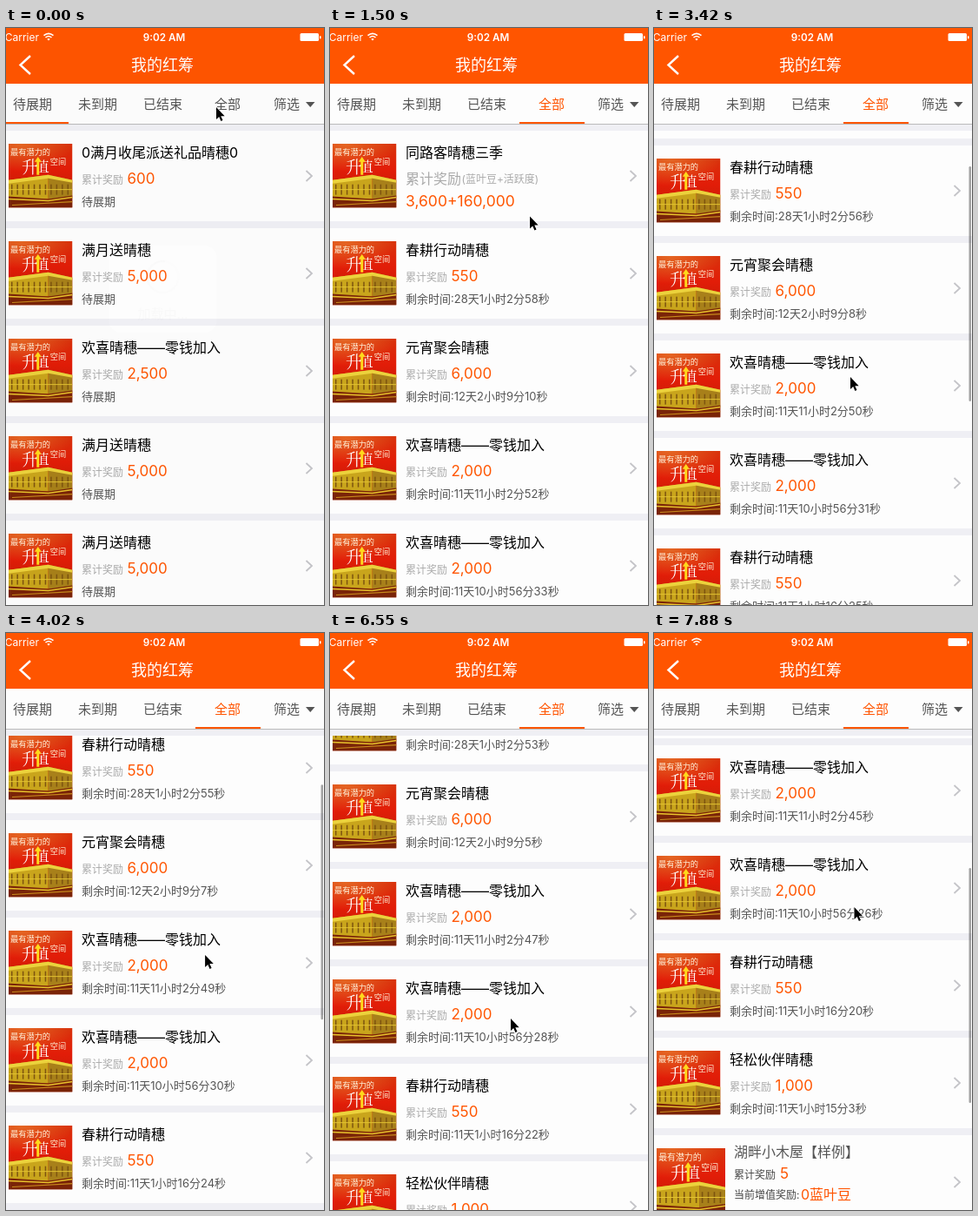
Animation of 366 by 663 pixels, one loop 8000 ms. Source, as an HTML page:

```html
<!DOCTYPE html>
<html lang="zh-CN">
<head>
<meta charset="utf-8">
<style>
html, body { margin: 0; width: 100%; height: 100%; overflow: hidden; background: #efeff4; }
svg { display: block; }
text { font-family: Inter, "Noto Sans CJK SC", "Noto Sans CJK", sans-serif; white-space: pre; }
.serif { font-family: "Noto Serif CJK SC", "Noto Sans CJK SC", serif; }
</style>
</head>
<body>
<svg id="stage" width="366" height="663" viewBox="0 0 366 663"></svg>
<script>
const ORANGE = '#f50', GRAY = '#555', PALE = '#aaa', PITCH = 112;
const $ = id => document.getElementById(id);

// y is the optical middle of the line
const text = (x, y, size, fill, str, attrs = '') =>
  `<text x="${x}" y="${y + size * .37}" font-size="${size}" fill="${fill}" ${attrs}>${str}</text>`;
const rect = (x, y, w, h, fill, attrs = '') =>
  `<rect x="${x}" y="${y}" width="${w}" height="${h}" fill="${fill}" ${attrs}/>`;
const line = (d, stroke, width) =>
  `<path d="${d}" fill="none" stroke="${stroke}" stroke-width="${width}"/>`;
const range = (n, fn) => Array.from({ length: n }, (_, i) => fn(i)).join('');

const thumb = `<symbol id="thumb" viewBox="0 0 74 74">
  ${rect(0, 0, 74, 74, 'url(#sky)')}
  ${rect(0, 0, 74, 40, 'url(#glow)')}
  <path d="M0 42 46 36V64H0Z" fill="#c9a51c"/>
  <path d="M46 36 74 42V62L46 64Z" fill="#a8801a"/>
  <path d="M0 42 46 36 74 42V45L46 40 0 46Z" fill="#ecd23c"/>
  ${range(11, i => rect(3 + i * 6.5, 47, 1.5, 12, '#7d5410'))}
  ${line('M0 53H74', '#e2c232', 1)}
  <path d="M0 61 46 64 74 60V74H0Z" fill="#7a2408"/>
  ${line('M0 64 46 66 74 62', '#e8c22c', 1.5)}
  ${line('M4 71 74 67', '#c88a1c', 1.2)}
  ${text(2, 10, 9.3, '#fff3dc', '最有潜力的', 'font-weight="500"')}
  ${text(48, 21, 9.3, '#fff3dc', '空间', 'font-weight="500"')}
  ${text(15, 27, 19, '#fff', '升', 'class="serif"')}
  ${text(31, 26, 16, '#fff', '值', 'class="serif"')}
  <path d="M34 15 38 21H35.500V36H32.500V21H30Z" fill="#ffd91c"/>
</symbol>`;

const defs = `<defs>
  <linearGradient id="sky" x2="0" y2="1">
    <stop stop-color="#d8330c"/><stop offset=".4" stop-color="#e21d08"/><stop offset="1" stop-color="#b51c06"/>
  </linearGradient>
  <radialGradient id="glow" cx=".2" cy="0" r=".8">
    <stop stop-color="#e8742a" stop-opacity=".8"/><stop offset="1" stop-color="#e8742a" stop-opacity="0"/>
  </radialGradient>${thumb}</defs>`;

const card = (i, body, size = 73.5, mid = 52) => `<g transform="translate(0 ${i * PITCH})">
  ${rect(0, 0, 366, 104, '#fdfdfd')}
  <use href="#thumb" x="3" y="15" width="${size}" height="${size}"/>${body}
  ${line(`M345.500 ${mid - 6}l6.500 6-6.500 6`, '#c4c4c8', 1.8)}</g>`;

const plain = (i, title, amount, note, attrs) => card(i,
  text(87, 25, 16, '#000', title) + text(87, 56.5, 12, PALE, '累计奖励') +
  text(139.5, 55, 17, ORANGE, amount) + text(87, 81, 13, GRAY, note, attrs));

const waiting = [
  ['0满月收尾派送礼品晴穗0', '600'], ['满月送晴穗', '5,000'], ['欢喜晴穗——零钱加入', '2,500'],
  ['满月送晴穗', '5,000'], ['满月送晴穗', '5,000']
].map(([title, amount], i) => plain(i, title, amount, '待展期')).join('');

// title, amount, fixed part of the remaining time, shift of the seconds
const timed = [
  ['春耕行动晴穗', '550', '28天1小时2分', 6],
  ['元宵聚会晴穗', '6,000', '12天2小时9分', -42],
  ['欢喜晴穗——零钱加入', '2,000', '11天11小时2分', 0],
  ['欢喜晴穗——零钱加入', '2,000', '11天10小时56分', -19],
  ['春耕行动晴穗', '550', '11天1小时16分', -25],
  ['轻松伙伴晴穗', '1,000', '11天1小时15分', -42]
];
const all =
  card(0, text(87, 25, 16, '#000', '同路客晴穗三季') + text(87, 55, 16, PALE, '累计奖励') +
    text(151.5, 56, 12, PALE, '(蓝叶豆+活跃度)') + text(87, 81, 17.5, ORANGE, '3,600+160,000')) +
  timed.map(([title, amount], i) => plain(i + 1, title, amount, '', `id="left${i}"`)).join('') +
  card(7, text(92, 19, 16, GRAY, '湖畔小木屋【样例】') + text(92, 45.5, 12, '#444', '累计奖励') +
    text(145, 44, 17, ORANGE, '5') + text(92, 68.5, 12, '#444', '当前增值奖励:') +
    text(169, 68, 16, ORANGE, '0蓝叶豆'), 79, 54);

const tabs = ['待展期', '未到期', '已结束'].map((s, i) => text(8 + i * 75, 87, 15, GRAY, s)).join('');

const ring = range(40, i => `<circle r="18" fill="none" stroke="#222" stroke-width="2"
  pathLength="40" stroke-dasharray="1.05 38.95" stroke-dashoffset="${-i}" opacity="${(i + 1) / 40}"/>`);

$('stage').innerHTML = defs + rect(0, 0, 366, 663, '#efeff4') +
  `<svg y="118" width="366" height="545"><g id="list"><g id="waiting">${waiting}</g><g id="all">${all}</g></g></svg>` +
  rect(362.5, 0, 2.5, 270, '#000', 'id="bar" rx="1.25"') +
  rect(0, 64, 366, 47, '#fdfdfd') + rect(0, 110, 366, 1, '#bbb') + tabs +
  text(240, 87, 15, GRAY, '全部', 'id="tab"') + text(308, 87.5, 15, GRAY, '筛选') +
  `<path d="M345 85h10.500l-5.250 6z" fill="${GRAY}"/>` +
  rect(0, 108, 75, 2, ORANGE, 'id="mark"') +
  rect(0, 0, 366, 64, ORANGE) + line('M28 32 16.500 42.500 28 53', '#fff', 2.4) +
  text(180, 42, 18, '#fff', '我的红筹', 'text-anchor="middle" font-weight="500"') +
  `<g id="hud">${rect(0, 0, 366, 663, '#000', 'opacity=".5"')}
    ${rect(118.5, 250, 124, 100, '#fff', 'rx="14"')}<g id="ring">${ring}</g>
    ${text(180.5, 328, 15, '#111', '加载中...', 'text-anchor="middle"')}</g>` +
  text(38, 10.5, 12, '#fff', 'Carrier', 'text-anchor="end"') +
  line('M43.500 8.700q5.500-4.800 11 0M45.500 11q3.500-3 7 0', '#fff', 1.6) +
  '<path d="M47.300 12.700q1.700-1.400 3.400 0l-1.700 1.800z" fill="#fff"/>' +
  text(182, 10.5, 11.7, '#fff', '9:02 AM', 'text-anchor="middle" font-weight="600"') +
  rect(338.5, 6, 21.5, 9, '#fff', 'rx="1.5"') + rect(361, 9, 1.5, 3.5, '#fff', 'rx=".7"') +
  `<path id="cursor" d="M0 0v14l3.200-3 2.200 5 2.100-.9-2.200-4.900h4.400z"
    stroke="#fff" stroke-width="1.4" paint-order="stroke"/>`;

const LOOP = 8000, STEP = 148.4; // the screen refreshes once per STEP ms

// keys: [time, value]
const scrollKeys = [[2720, 0], [2820, 10], [3413, 95], [4749, 167], [5050, 183], [6640, 183], [7865, 325]];
const barKeys = [[2700, 0], [2850, .36], [5200, .36], [5550, 0], [6640, 0], [6780, .36]];
const hudKeys = [[-2, 0], [144, 1], [850, 1], [1020, 0]];
const xKeys = [[1050, 242], [2500, 202], [2671, 202], [3413, 226], [4749, 233], [5050, 234], [5550, 234], [6400, 208], [6640, 208], [7865, 230.5]];
const yKeys = [[1050, 91], [2500, 510], [2671, 510], [3413, 401], [4749, 331], [5050, 315], [5550, 315], [6400, 443], [6640, 443], [7865, 315]];

function at(keys, t) {
  const i = keys.findIndex(k => k[0] > t);
  if (i === 0) return keys[0][1];
  if (i < 0) return keys[keys.length - 1][1];
  const [t0, a] = keys[i - 1], [t1, b] = keys[i];
  return a + (b - a) * (t - t0) / (t1 - t0);
}

const set = (id, name, value) => $(id).setAttribute(name, value);

function draw(t) {
  const scroll = Math.round(at(scrollKeys, t));
  const slide = Math.min(t / 300, 1);
  const seconds = 53 - Math.max(0, Math.floor((t + 180) / 1000));
  const loaded = t >= 440;

  set('list', 'transform', `translate(0 ${-scroll})`);
  set('waiting', 'display', loaded ? 'none' : 'inline');
  set('all', 'display', loaded ? 'inline' : 'none');
  set('bar', 'y', 113 + scroll * .483);
  set('bar', 'opacity', at(barKeys, t));
  set('mark', 'x', -3 + 221 * slide * slide * (3 - 2 * slide));
  set('tab', 'fill', t < 140 ? GRAY : ORANGE);
  set('hud', 'opacity', at(hudKeys, t));
  set('ring', 'transform', `translate(180.5 286) rotate(${185 + (t - 742) * .36})`);
  set('cursor', 'transform', `translate(${at(xKeys, t)} ${at(yKeys, t)})`);
  timed.forEach(([, , head, shift], i) => {
    $('left' + i).textContent = `剩余时间:${head}${seconds + shift}秒`;
  });
}

const start = performance.now();
function tick() {
  const t = (performance.now() - start) % LOOP;
  draw(Math.floor(t / STEP) * STEP);
  requestAnimationFrame(tick);
}
tick();
</script>
</body>
</html>
```
